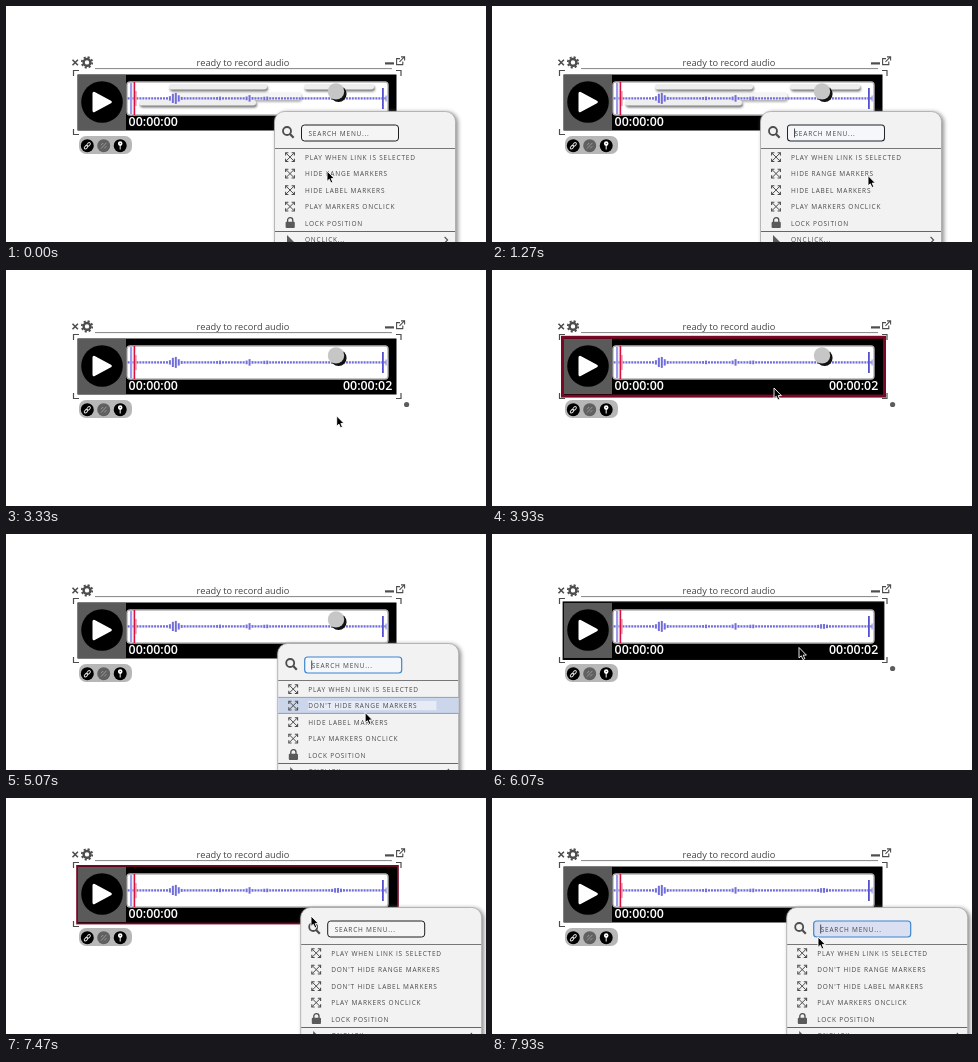
Animation, 480 px wide and 236 px high, one loop 8 s. Source, as an HTML page:

```html
<!DOCTYPE html>
<html lang="en">
<head>
<meta charset="utf-8">
<title>Audio recorder</title>
<style>
  html, body { margin: 0; width: 100%; height: 100%; overflow: hidden; background: #fff; }
  svg { display: block; width: 480px; height: 236px; font-family: "Open Sans", "Noto Sans", sans-serif; }
  .menu-text { font-size: 6.5px; letter-spacing: .78px; fill: #4a4a4a; }
  .time { font-size: 12.4px; font-weight: 600; fill: #fff; }
  .line { fill: none; stroke: #4d4d4d; }
  #menu > .panel { filter: drop-shadow(2.5px 1px 2px #8c8c8c); }
  #ranges rect { fill: #eeeeef; filter: drop-shadow(1.5px 2px 1.2px #777); }
</style>
</head>
<body>
<svg viewBox="0 0 480 236" xmlns="http://www.w3.org/2000/svg">
  <defs>
    <g id="expand" class="line">
      <path d="M1 1L9 9M9 1L1 9" stroke-width="1"/>
      <path d="M.6 3.4V.6H3.4M6.6 .6H9.4V3.4M9.4 6.6V9.4H6.6M3.4 9.4H.6V6.6" stroke-width="1.1"/>
    </g>
  </defs>

  <!-- title bar -->
  <path class="line" d="M66.5 53.8l5.4 5.4M71.9 53.8l-5.4 5.4" stroke-width="1.6"/>
  <circle class="line" cx="81" cy="56.4" r="3.4" stroke-width="2.4"/>
  <circle class="line" cx="81" cy="56.4" r="5.2" stroke-width="1.8" stroke-dasharray="2.1 1.984"/>
  <text x="237" y="60" text-anchor="middle" font-size="9.25" fill="#444">ready to record audio</text>
  <path d="M89 62.6H386" stroke="#777" stroke-width=".9"/>
  <path class="line" d="M379 57.4h9" stroke-width="2.2"/>
  <path class="line" d="M394 52.6h-3.4v6h6.2v-3M393.5 55.8l4.6-4.7M395 50.9h3.6V54.6" stroke-width="1.1"/>
  <path class="line" d="M67.5 70V64.5H73M390 64.5h5V70M67.5 123v5.5H73M390 128.5h5V123" stroke-width="1.2"/>

  <!-- player -->
  <rect x="71.5" y="68.5" width="319" height="56"/>
  <rect id="frame"/>
  <rect id="edge" x="71" y="125.6" width="321" height="3.6" fill="#bdbdbd"/>
  <rect x="72" y="69" width="48" height="55" fill="#5a5a5a"/>
  <circle cx="96" cy="96" r="20.8"/>
  <path d="M88 87.3L104.3 96L88 104.7Z" fill="#fff" stroke="#fff" stroke-width="3" stroke-linejoin="round"/>
  <rect x="121" y="76" width="261" height="33" rx="3" fill="#fff" stroke="#b4b4b4" stroke-width="1.4"/>
  <g id="ranges">
    <rect x="168" y="86" width="127" height="8" rx="3" opacity=".55"/>
    <rect x="163" y="78" width="98" height="5.5" rx="2.7"/>
    <rect x="133" y="94" width="117" height="5.5" rx="2.7"/>
    <rect x="298" y="78" width="70" height="5.5" rx="2.7"/>
  </g>
  <g id="wave" fill="#716dda"></g>
  <rect x="124" y="77" width="2.2" height="31" fill="#a09cec"/>
  <rect x="127.6" y="76" width="1.6" height="33" fill="#dc103c"/>
  <rect x="129" y="85" width="1.6" height="15" fill="#e88aa5"/>
  <rect x="376" y="82" width="1.8" height="21" fill="#5450cf"/>
  <rect x="379.4" y="89.5" width="1.4" height="6" fill="#a6a3ec"/>
  <g id="label">
    <circle cx="332.6" cy="88" r="8" fill="#111"/>
    <circle cx="330" cy="85.4" r="8.2" fill="#c6c6c6"/>
  </g>
  <text class="time" x="122.6" y="120.3">00:00:00</text>
  <text class="time" x="337" y="120.3">00:00:02</text>

  <!-- buttons -->
  <rect x="73" y="130" width="53" height="18" rx="7" fill="#b7b7b7"/>
  <circle cx="81.3" cy="139.7" r="6.5"/>
  <circle cx="97.7" cy="139.7" r="6.5" fill="#606060"/>
  <circle cx="114.2" cy="139.7" r="6.5"/>
  <g fill="none" stroke="#ddd">
    <ellipse cx="80" cy="141.2" rx="2.1" ry="1.3" transform="rotate(-45 80 141.2)"/>
    <ellipse cx="82.6" cy="138.4" rx="2.1" ry="1.3" transform="rotate(-45 82.6 138.4)"/>
    <path d="M95 142.5l5.4-5.6M95 139.2l2.2-2.2M98.2 142.4l2.2-2.2" stroke="#999"/>
    <path d="M114.2 138v5.4" stroke-width="1.1"/>
    <circle cx="114.2" cy="137.6" r="1.4" stroke="#fff" stroke-width="1.8"/>
  </g>
  <circle cx="400.6" cy="134.5" r="2.6" fill="#5c5c5c"/>

  <g id="menu">
    <rect class="panel" x="268.5" y="105.5" width="181" height="150" rx="10" fill="#f2f2f2" stroke="#aaa" stroke-width=".8"/>
    <circle class="line" cx="281" cy="125" r="4" stroke-width="1.8"/>
    <path class="line" d="M284 128l3.6 3.8" stroke-width="2.2"/>
    <rect id="field" x="295.5" y="119" width="97" height="16" rx="3"/>
    <text class="menu-text" x="302.5" y="129.8">SEARCH MENU...</text>
    <path id="caret" d="M302.5 122.5v9" stroke="#222" stroke-width=".8"/>
    <path d="M269 142.5H449" stroke="#777"/>
    <g id="hover">
      <rect x="269" y="-8" width="180.4" height="16" fill="#ccd6eb"/>
      <path d="M269 -8.2H449.4M269 7.8H449.4" stroke="#8d96a8" stroke-width=".9"/>
      <rect id="hoverText" x="299" y="-4.6" height="9.2" fill="#e6ebf5"/>
    </g>
    <g id="items"></g>
    <rect x="279.6" y="215.8" width="9.2" height="6.2" rx="1" fill="#5a5a5a"/>
    <path class="line" d="M281.6 216v-1.8a2.6 2.6 0 0 1 5.2 0V216" stroke-width="1.3"/>
    <path d="M269 225.5H449" stroke="#666" stroke-width="1.2"/>
    <path d="M281 229v10l8-2z" fill="#5a5a5a"/>
    <text class="menu-text" x="299" y="236.4">ONCLICK...</text>
    <path class="line" d="M438.6 231l3 3-3 3" stroke-width="1.1"/>
  </g>

  <g id="cursor" stroke="#fff" stroke-linejoin="round">
    <path id="arrow" d="M0 0V10.4L2.3 8.3L3.9 12L5.8 11.2L4.2 7.6H7.4Z" stroke-width=".9"/>
    <path id="hand" d="M-1 .4a1 1 0 0 1 2 0V3.2L4 3.8Q5 4.2 4.8 5.4L4 8.2V10H-.8V8.6L-3.6 5.6Q-3.2 4.2-2 5L-1 5.8Z" fill="#f4f4f4" stroke="#222" stroke-width=".9"/>
    <path id="resize" d="M0 -5.4L2.2 -2.6H.7V2.6H2.2L0 5.4L-2.2 2.6H-.7V-2.6H-2.2Z" stroke="none"/>
  </g>
</svg>
<script>
const LOOP = 8000, ROW = 16.5, FIRST_ROW = 151.1, EDGE = 130;
const $ = id => document.getElementById(id);
const set = (el, attrs) => { for (const k in attrs) el.setAttribute(k, attrs[k]); };
const show = (el, on) => el.setAttribute('display', on ? 'inline' : 'none');
const add = (parent, tag, attrs) => {
  const el = document.createElementNS('http://www.w3.org/2000/svg', tag);
  set(el, attrs);
  return parent.appendChild(el);
};
const clamp = v => Math.max(0, Math.min(1, v));
const ramp = (t, start, length) => clamp((t - start) / length);
const ease = (t, start, length) => { const p = ramp(t, start, length); return p * p * (3 - 2 * p); };
const mix = (a, b, p) => `rgb(${a.map((v, i) => Math.round(v + (b[i] - v) * p))})`;

// Each visit: pointer enters the player, opens the menu there, then picks an item
const visits = [
  { enter: -2000, open: -500, focus: 1260, close: 2660, dx: 0, dy: 0 },
  { enter: 3500, open: 4300, focus: 4480, close: 5520, dx: 3.2, dy: 4 },
  { enter: 5880, open: 7320, focus: 7500, close: 9000, dx: 26.2, dy: 4 }
];

// Eased pointer moves: from, to, x, y
const moves = [
  [0, 1, 321, 165], [300, 800, 376, 169.5], [1730, 2300, 367.5, 167],
  [2900, 3850, 282, 118], [4200, 5240, 365, 183], [5840, 6060, 307, 113.5],
  [6700, 6920, 309, EDGE], [6950, 7250, 305, 118], [7600, 7920, 326, 139]
];
function pointer(t) {
  let [, , x, y] = moves[0];
  for (const [from, to, nx, ny] of moves) {
    const p = ease(t, from, to - from);
    x += (nx - x) * p;
    y += (ny - y) * p;
  }
  return { x, y };
}

const bumps = [[168, 9, 4.2], [212, 2, 1.6], [242, 4.5, 2.2], [259, 2, 2], [330, 2.6, 4.5]];
for (let x = 121.6; x < 380; x += 2.95) {
  const h = bumps.reduce((sum, [at, size, width]) => sum + size * Math.exp(-(((x - at) / width) ** 2)), 2.3);
  add($('wave'), 'rect', { x, y: 92.4 - h / 2, width: 2, height: h });
}

const labels = ['PLAY WHEN LINK IS SELECTED', 'HIDE RANGE MARKERS', 'HIDE LABEL MARKERS',
  'PLAY MARKERS ONCLICK', 'LOCK POSITION'];
const items = labels.map((text, i) => {
  const y = FIRST_ROW + i * ROW;
  if (i < 4) add($('items'), 'use', { href: '#expand', x: 279, y: y - 5 });
  const el = add($('items'), 'text', { class: 'menu-text', x: 299, y: y + 2.5 });
  el.textContent = text;
  return el;
});

// The highlight trails the pointer slightly
const rowAt = (menu, t) => Math.round((pointer(t - 130).y - menu.dy - FIRST_ROW) / ROW);

function drawMenu(t, menu, row) {
  show($('menu'), menu);
  if (!menu) return;
  set($('menu'), { transform: `translate(${menu.dx} ${menu.dy})`, opacity: ramp(t, menu.open, 130) });

  const focus = ramp(t, menu.focus, 130);
  const tint = menu === visits[2] ? ramp(t, 7660, 140) : 0;
  set($('field'), {
    fill: focus ? mix([246, 247, 251], [218, 224, 242], tint) : '#f5f5f5',
    stroke: mix([30, 30, 30], [62, 134, 208], focus),
    'stroke-width': 1 + .2 * focus
  });
  show($('caret'), focus > 0);

  const done = visits.indexOf(menu);
  items.forEach((el, i) => {
    el.textContent = (i > 0 && i <= done ? "DON'T " : '') + labels[i];
  });
  show($('hover'), row >= 0);
  if (row >= 0) {
    set($('hover'), { transform: `translate(0 ${FIRST_ROW + row * ROW})` });
    set($('hoverText'), { width: items[row].getComputedTextLength() + 19 });
  }
}

// The frame grows and reddens on hover, and thins near the resize edge
function drawFrame(t, visit, y) {
  const hover = ease(t, visit.enter, 400) * (1 - ease(t, visit.open, 350));
  const near = clamp(1 - Math.abs(y - EDGE) / 8);
  const w = hover * (3 - 1.8 * near);
  const red = ramp(t, visit.enter + 200, 200) * (.8 + .3 * near);
  set($('frame'), {
    x: 72 - w / 2, y: 68.8 - w / 2, width: 319 + w, height: 55.8 + w,
    fill: w > .1 ? '#000' : 'none',
    stroke: mix([10, 8, 10], [150, 8, 42], red), 'stroke-width': w
  });
  const onEdge = hover > .5 && Math.abs(y - EDGE) < 4;
  show($('edge'), onEdge);
  return onEdge;
}

function draw(t) {
  show($('ranges'), t < visits[0].close);
  show($('label'), t < visits[1].close);
  const { x, y } = pointer(t);
  const visit = visits.filter(v => v.enter <= t).pop();
  const menu = t >= visit.open && t < visit.close ? visit : null;
  const row = menu && t > menu.focus + 450 ? rowAt(menu, t) : -1;
  const onEdge = drawFrame(t, visit, y);
  drawMenu(t, menu, row);

  const settled = row >= 0 && row === rowAt(menu, t - 120);
  const kind = onEdge ? 'resize' : settled ? 'hand' : 'arrow';
  set($('cursor'), { transform: `translate(${x} ${y})` });
  for (const id of ['arrow', 'hand', 'resize']) show($(id), id === kind);
}

const begin = performance.now();
function tick() {
  draw((performance.now() - begin) % LOOP);
  requestAnimationFrame(tick);
}
tick();
</script>
</body>
</html>
```
